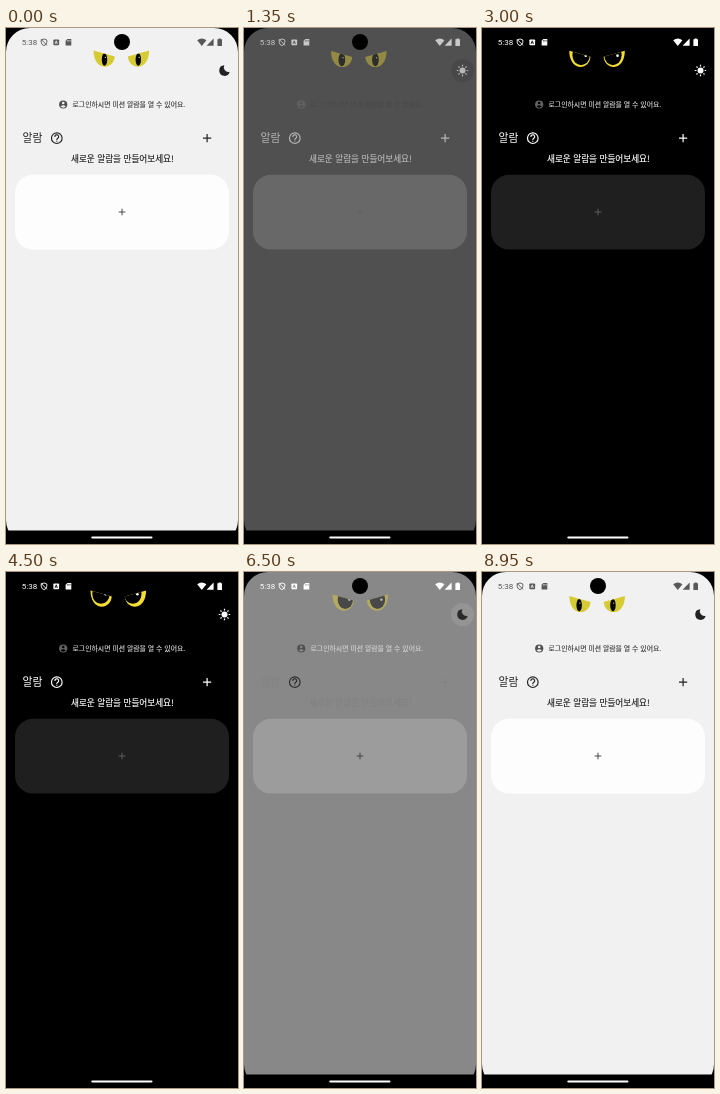
An HTML page for the animation above (9 s loop, 232 px wide and 516 px high).

```html
<!DOCTYPE html>
<html lang="ko">
<head>
<meta charset="utf-8">
<title>알람</title>
<style>
  html, body { margin: 0; width: 100%; height: 100%; overflow: hidden; background: #000; }
  svg { display: block; width: 100%; height: 100%; }
  text { font-family: "Noto Sans CJK KR", "Noto Sans CJK", "Noto Sans CJK JP", sans-serif; }
  .status { fill: var(--status); }
  .status-line { fill: none; stroke: var(--status); stroke-width: .9; }
  .title { fill: var(--title); }
  .title-line { stroke: var(--title); }
  .line { fill: none; }
</style>
</head>
<body>
<svg viewBox="0 0 232 516">
  <defs>
    <clipPath id="screen"><rect width="232" height="516" rx="24"/></clipPath>
    <path id="lid" d="M87.5 22.5 L108.8 28.5 C108.2 34.8 103.5 38.9 98.4 38.7 C91.5 38.3 87.6 31.5 87.5 22.5Z"/>
    <clipPath id="leftLid"><use href="#lid"/></clipPath>
    <clipPath id="rightLid"><use href="#lid" transform="translate(230.6 0) scale(-1 1)"/></clipPath>
  </defs>

  <rect width="232" height="502.5" fill="var(--bg)" clip-path="url(#screen)"/>

  <g id="eyes">
    <g clip-path="url(#leftLid)">
      <rect x="85" y="20" width="26" height="22" fill="var(--iris)"/>
      <g class="pupil"><ellipse/><circle fill="#fff"/></g>
    </g>
    <g clip-path="url(#rightLid)">
      <rect x="119" y="20" width="26" height="22" fill="var(--iris)"/>
      <g class="pupil"><ellipse/><circle fill="#fff"/></g>
    </g>
  </g>
  <circle cx="116" cy="14" r="8"/>

  <!-- status bar -->
  <text class="status" x="15.8" y="17.2" font-size="8" style="font-family:Roboto,sans-serif">5:38</text>
  <path class="status-line" d="M38 10.9 L40.8 12 V14.2 Q40.8 16.6 38 17.7 Q35.2 16.6 35.2 14.2 V12Z M35 11.2 L41 17.4"/>
  <rect class="status" x="47.4" y="11.5" width="5.7" height="5.7" rx=".8"/>
  <path d="M49 15.8 L50.25 12.8 L51.5 15.8 M49.5 14.9 H51" class="line" stroke="var(--bg)" stroke-width=".8"/>
  <path class="status" d="M61.4 10.9 H65.3 V17.6 H59.6 V12.8Z"/>
  <path d="M61.4 12 V13.6 M62.8 12 V13.6 M64.2 12 V13.6" stroke="var(--bg)" stroke-width=".6"/>
  <path class="status" d="M191.2 12.2 Q195.8 8.9 200.4 12.2 L195.8 18Z"/>
  <path class="status" d="M207.6 10.6 V17.8 H200.6Z"/>
  <path class="status" d="M212.6 11.2 V10.4 H214.8 V11.2 H216 V17.9 H211.4 V11.2Z"/>

  <!-- theme button -->
  <circle id="ripple" cx="218.5" cy="42.5" r="11.5"/>
  <path id="moon" fill="var(--icon)" d="M218.3 37.3 A5.3 5.3 0 1 0 223.7 43.8 A4.6 4.6 0 0 1 218.3 37.3Z"/>
  <g id="sun" transform="translate(218.5 42.5)" stroke="var(--icon)">
    <circle r="3" fill="var(--icon)" stroke="none"/>
    <path id="rays" stroke-width="1.2"/>
  </g>

  <!-- login hint -->
  <circle cx="57.2" cy="76.5" r="4.1" fill="var(--account)"/>
  <circle cx="57.2" cy="75" r="1.3" fill="var(--bg)"/>
  <path d="M54.6 78.5 Q57.2 76.2 59.8 78.5 Q57.2 80.8 54.6 78.5Z" fill="var(--bg)"/>
  <text x="66.5" y="79.3" font-size="6.88" fill="var(--hint)" stroke="var(--hint)" stroke-width=".12">로그인하시면 미션 알람을 열 수 있어요.</text>

  <!-- header -->
  <text class="title" x="16.6" y="114.3" font-size="10.8">알람</text>
  <g class="line" stroke="var(--icon)" stroke-width="1.15">
    <circle cx="50.8" cy="110.2" r="5.3"/>
    <path d="M48.9 109 A1.9 1.9 0 1 1 51.8 110.3 Q50.8 111 50.8 112 M50.8 112.7 V113.8"/>
  </g>
  <path class="title-line" stroke-width="1.2" d="M197 110.2 H205.2 M201.1 106.1 V114.3"/>
  <text class="title title-line" x="65" y="133.8" font-size="8.65" font-weight="500" stroke-width=".15">새로운 알람을 만들어보세요!</text>

  <!-- empty alarm card -->
  <rect x="9" y="146.8" width="214" height="74.8" rx="18" fill="var(--card)"/>
  <path stroke="var(--add)" stroke-width=".95" d="M112.7 184 H119.3 M116 180.7 V187.3"/>

  <rect x="85.3" y="508.4" width="61.2" height="2" rx="1" fill="#fff"/>
</svg>
<script>
const LOOP = 9000, TO_DARK = 1217, TO_LIGHT = 6388;

// start, end, eye x, eye y, pupil x, pupil y
const glances = [
  [1300, 2150, -3, 3, -1.5, 1],
  [2550, 3350, 0, 0, 0, 0],
  [3700, 4500, -3, -4, -1.5, -1],
  [4700, 5500, 3, -5, 2, -1],
  [5650, 6550, 1, 0, 1, 0],
  [6600, 7500, 1, 1, 3.5, 0.5],
  [7550, 8450, 0, 5, -1, 1],
  [8550, 9400, -0.2, 1, -1.2, 0]
];

const $ = id => document.getElementById(id);
const ramp = (t, start, length) => Math.min(1, Math.max(0, (t - start) / length));
const mix = (a, b, k) => a + (b - a) * k;
const easeOut = k => 1 - (1 - k) ** 3;
const darkness = (t, delay, length, backDelay = delay) =>
  ramp(t, TO_DARK + delay, length) - ramp(t, TO_LIGHT + backDelay, length);
const blend = (a, b, k) => `rgb(${a.map((v, i) => Math.round(mix(v, b[i], k)))})`;
const grey = (a, b, k) => blend([a, a, a], [b, b, b], k);
const setColor = (name, value) => document.documentElement.style.setProperty('--' + name, value);
const setAttrs = (el, attrs) => Object.entries(attrs).forEach(([k, v]) => el.setAttribute(k, v));

$('rays').setAttribute('d', Array.from({ length: 8 }, (_, i) => {
  const c = Math.cos(i * Math.PI / 4), s = Math.sin(i * Math.PI / 4);
  return `M${4.1 * c} ${4.1 * s}L${5.7 * c} ${5.7 * s}`;
}).join(''));

const pupils = [...document.querySelectorAll('.pupil')];

function drawTheme(t) {
  const theme = darkness(t, 0, 200), instant = darkness(t, 0, 1);
  setColor('bg', grey(241, 0, theme));
  setColor('card', grey(253, 31, theme));
  setColor('title', grey(34, 255, theme));
  setColor('hint', grey(51, 222, darkness(t, 100, 250)));
  setColor('status', grey(88, 255, darkness(t, 0, 200, 120)));
  setColor('icon', grey(34, 255, darkness(t, 0, 200, -80)));
  setColor('account', grey(80, 98, instant));
  setColor('add', grey(64, 98, instant));
  setColor('iris', blend([214, 203, 50], [245, 222, 48], theme));
  $('moon').style.display = instant ? 'none' : '';
  $('sun').style.display = instant ? '' : 'none';

  const tap = t < 4000 ? TO_DARK : TO_LIGHT;
  setAttrs($('ripple'), {
    fill: tap === TO_DARK ? '#000' : '#fff',
    opacity: 0.14 * ramp(t, tap - 20, 60) * (1 - ramp(t, tap + 50, 250))
  });
}

function drawEyes(t) {
  let pose = [0, 0, 0, 0];
  for (const [start, end, ...next] of glances) {
    const k = easeOut(ramp(t, start, end - start));
    pose = pose.map((v, i) => mix(v, next[i], k));
  }
  const [x, y, px, py] = pose;
  const wide = darkness(t, 100, 300, 60);
  const fade = Math.sin(Math.PI * ramp(t, TO_DARK, 300)) + Math.sin(Math.PI * ramp(t, TO_LIGHT, 300));
  setAttrs($('eyes'), { transform: `translate(${x} ${y})`, opacity: 1 - 0.58 * fade });

  // Wide pupils sit closer together and reach above the lids.
  pupils.forEach((pupil, i) => {
    const cx = 98.5 + 33.8 * i + px + (i ? -1 : 1) * wide;
    const cy = mix(31.5, 27, wide) + py;
    setAttrs(pupil.children[0], { cx, cy, rx: mix(2.7, 8.7, wide), ry: mix(6.2, 9.8, wide) });
    setAttrs(pupil.children[1], { cx: cx + mix(0.8, 4.6, wide), cy: cy + mix(-2.2, 0.3, wide), r: mix(0.6, 1.3, wide) });
  });
}

function frame() {
  const t = performance.now() % LOOP;
  drawTheme(t);
  drawEyes(t);
  requestAnimationFrame(frame);
}
frame();
</script>
</body>
</html>
```
